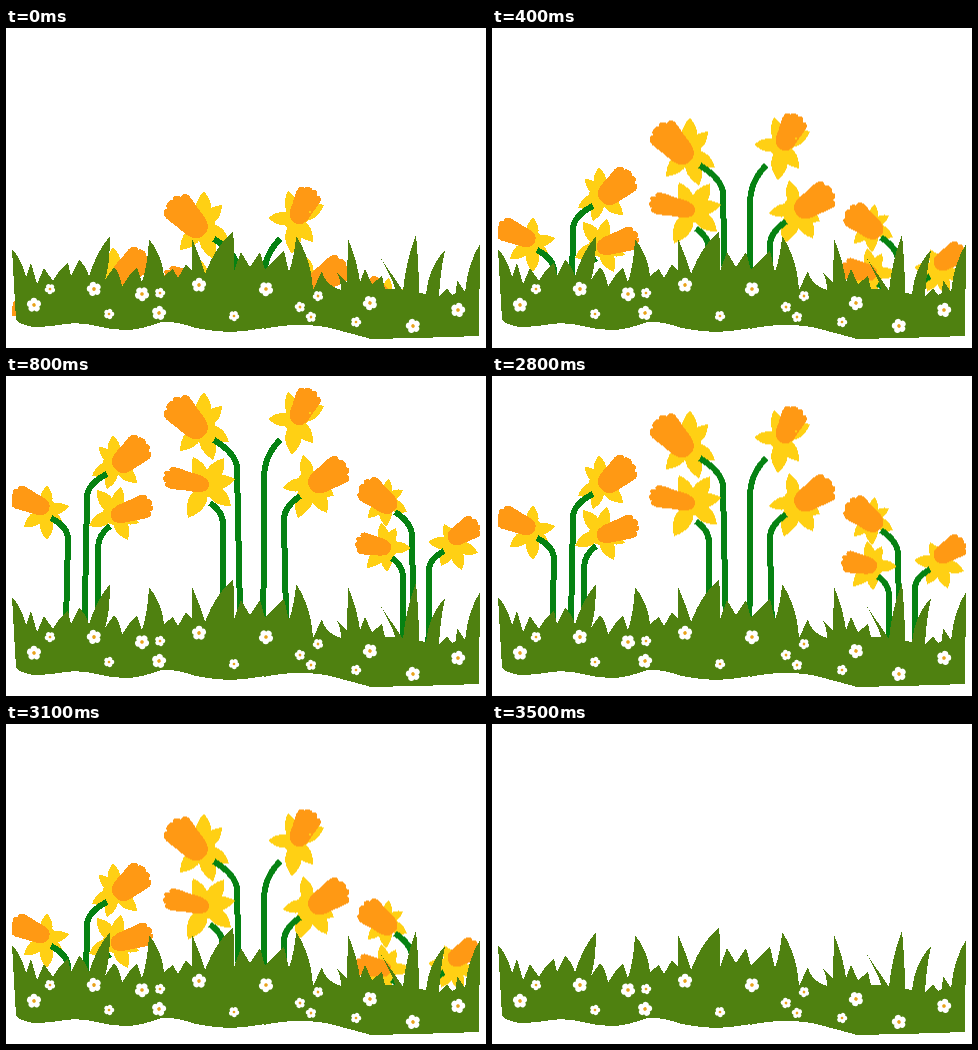
An HTML page that plays this animation: 480 px wide and 320 px high, repeating every 4500 ms.

```html
<!DOCTYPE html>
<html lang="en">
<head>
<meta charset="utf-8">
<title>Daffodils</title>
<style>
  html, body { margin: 0; width: 100%; height: 100%; overflow: hidden; background: #fff; }
  svg { display: block; width: 100%; height: 100%; }
  .crisp { shape-rendering: crispEdges; }
  .grass { fill: #4f8110; }
  .stem { fill: none; stroke: #068212; stroke-width: 6; }
  .petal { fill: #ffd014; }
  .cup { fill: #ff9914; }
  /* The small negative delay keeps step edges clear of rounding. */
  .clump { animation: grow 4500ms -2ms infinite; }
  @keyframes grow {
    0% { transform: translateY(var(--drop)); visibility: visible; animation-timing-function: steps(8, end); }
    17.7778% { transform: none; animation-timing-function: step-end; }
    60% { transform: none; animation-timing-function: steps(8, end); }
    77.7777% { transform: translateY(var(--drop)); visibility: visible; animation-timing-function: step-end; }
    77.7778%, 100% { transform: translateY(var(--drop)); visibility: hidden; animation-timing-function: step-end; }
  }
</style>
</head>
<body>
<svg viewBox="0 0 480 320" preserveAspectRatio="none">
  <defs>
    <clipPath id="soil"><rect x="6" width="468" height="288"/></clipPath>
    <path id="cup" d="M0 0C0 .5 .1 .8 .45 .85C.6 .9 .7 1 .8 1C.9 1 .95 .75 .9 .55C1 .6 1.05 .2 .97 .1C1.06 -.1 1 -.5 .93 -.55C.97 -.8 .9 -1 .78 -1C.7 -1 .6 -.9 .45 -.85C.1 -.8 0 -.5 0 0Z"/>
    <g id="daisy"></g>
  </defs>
  <g id="flowers" class="crisp" clip-path="url(#soil)"></g>
  <g class="grass crisp">
    <path d="M6 221Q16 232 20 249L25 235L31 256L38 240L47 253Q53 241 62 235L65 248L73 232Q80 238 83 248Q91 223 104 208Q104 236 99 252L108 239Q114 245 116 259Q123 246 131 240L136 254Q142 236 143 211Q156 227 158 248L167 241L172 250L180 236L186 243L186 211Q193 226 199 246Q209 219 227 203Q229 225 228 243L235 224L244 239L254 224L259 242V300Q242 303 225 304Q205 303 190 300Q170 293 155 294Q135 302 118 302Q103 301 90 298Q75 294 60 296Q44 299 28 299Q15 297 10 292Z"/>
    <path d="M258 242L278 223L283 244Q289 226 290 208Q305 230 307 262L316 243Q319 257 335 262Q335 252 331 245L341 254L342 211Q351 232 354 254L359 241L366 256L376 248L379 261L389 261Q386 249 374 229L397 263Q400 232 410 207Q413 240 413 265L420 266Q423 239 439 222Q434 246 433 268L441 260L446 267L450 265L451 252L459 264Q462 235 474 216L473 308Q420 310 365 311Q340 304 320 299Q288 294 258 301Z"/>
  </g>
  <g id="daisies"></g>
</svg>
<script>
const byId = id => document.getElementById(id);

function petal([cx, cy], [tx, ty]) {
  const dx = tx - cx, dy = ty - cy;
  const side = s => `${cx + dx * .45 - dy * s} ${cy + dy * .45 + dx * s}`;
  return `M${cx} ${cy}Q${side(.47)} ${tx} ${ty}Q${side(-.47)} ${cx} ${cy}Z`;
}

function daffodil({ heart, tips, base, rim, width, stem }) {
  const dx = rim[0] - base[0], dy = rim[1] - base[1];
  const angle = Math.atan2(dy, dx) * 180 / Math.PI;
  const petals = tips.map(tip => `<path d="${petal(heart, tip)}"/>`).join('');
  return `<g class="petal">${petals}<circle cx="${heart[0]}" cy="${heart[1]}" r="12"/></g>
    <path class="stem" d="${stem}"/>
    <use href="#cup" class="cup" transform="translate(${base}) rotate(${angle}) scale(${Math.hypot(dx, dy)} ${width})"/>`;
}

function addClump(drop, plants, extra = '') {
  byId('flowers').innerHTML +=
    `<g class="clump" style="--drop:${drop}px">${plants.map(daffodil).join('')}${extra}</g>`;
}

addClump(160, [
  { heart: [109, 87], tips: [[107, 59], [93, 71], [86, 100], [101, 113], [131, 107]],
    base: [109, 93], rim: [140, 66], width: 15, stem: 'M101 98Q81 108 81 122L77 330' },
  { heart: [109, 137], tips: [[91, 114], [115, 111], [83, 150], [122, 164], [133, 147]],
    base: [105, 141], rim: [146, 128], width: 12, stem: 'M104 150Q92 159 92 172L91 330' },
  { heart: [40, 135], tips: [[41, 109], [63, 130], [57, 149], [41, 164], [18, 151]],
    base: [43, 134], rim: [6, 118], width: 12, stem: 'M45 142Q62 151 62 163L58 330' }
]);

addClump(147, [
  { heart: [197, 50], tips: [[198, 16], [216, 30], [223, 66], [207, 84], [174, 75]],
    base: [198, 60], rim: [165, 25], width: 16, stem: 'M208 64Q231 78 231 93L236 330' },
  { heart: [289, 44], tips: [[282, 16], [262, 43], [286, 79], [307, 67], [318, 30]],
    base: [289, 48], rim: [306, 14], width: 13, stem: 'M274 64Q258 80 258 102L257 330' },
  { heart: [200, 109], tips: [[187, 81], [218, 82], [229, 103], [225, 130], [182, 142]],
    base: [203, 110], rim: [158, 100], width: 11, stem: 'M204 127Q217 136 217 148L217 330' },
  { heart: [304, 106], tips: [[297, 79], [277, 112], [292, 142], [321, 137], [328, 120]],
    base: [304, 112], rim: [340, 89], width: 15, stem: 'M294 120Q278 131 278 143L279 200L283 330' }
], '<path class="petal" d="M303 36h2v2h-2zM311 34l4 -2v3z"/>');

addClump(147, [
  { heart: [379, 124], tips: [[383, 103], [397, 114], [401, 136], [380, 151], [362, 142]],
    base: [389, 134], rim: [356, 108], width: 14, stem: 'M389 136Q406 147 406 160L409 330' },
  { heart: [380, 171], tips: [[375, 147], [390, 152], [405, 172], [381, 196], [361, 192]],
    base: [385, 173], rim: [350, 166], width: 11, stem: 'M386 182Q397 190 397 201L396 330' },
  { heart: [447, 168], tips: [[438, 148], [422, 166], [435, 190], [456, 194], [472, 177]],
    base: [443, 165], rim: [472, 147], width: 12, stem: 'M438 175Q422 184 423 196L422 330' }
]);

byId('daisy').innerHTML = [0, 72, 144, 216, 288]
  .map(a => `<circle cx="4" r="3.2" fill="#fff" transform="rotate(${a})"/>`).join('') +
  '<circle r="3" fill="#fff"/><circle r="1.8" fill="#e9a21b"/>';

const bigDaisies = [[28, 277], [88, 261], [136, 266], [153, 285], [193, 257], [260, 261], [364, 275], [407, 298], [452, 282]];
const smallDaisies = [[44, 261], [103, 286], [154, 265], [228, 288], [294, 279], [305, 289], [312, 268], [350, 294]];
const daisies = (places, size) => places.map(([x, y]) =>
  `<use href="#daisy" transform="translate(${x} ${y}) rotate(${x * 7 % 72}) scale(${size})"/>`).join('');
byId('daisies').innerHTML = daisies(bigDaisies, 1) + daisies(smallDaisies, .74);
</script>
</body>
</html>
```
